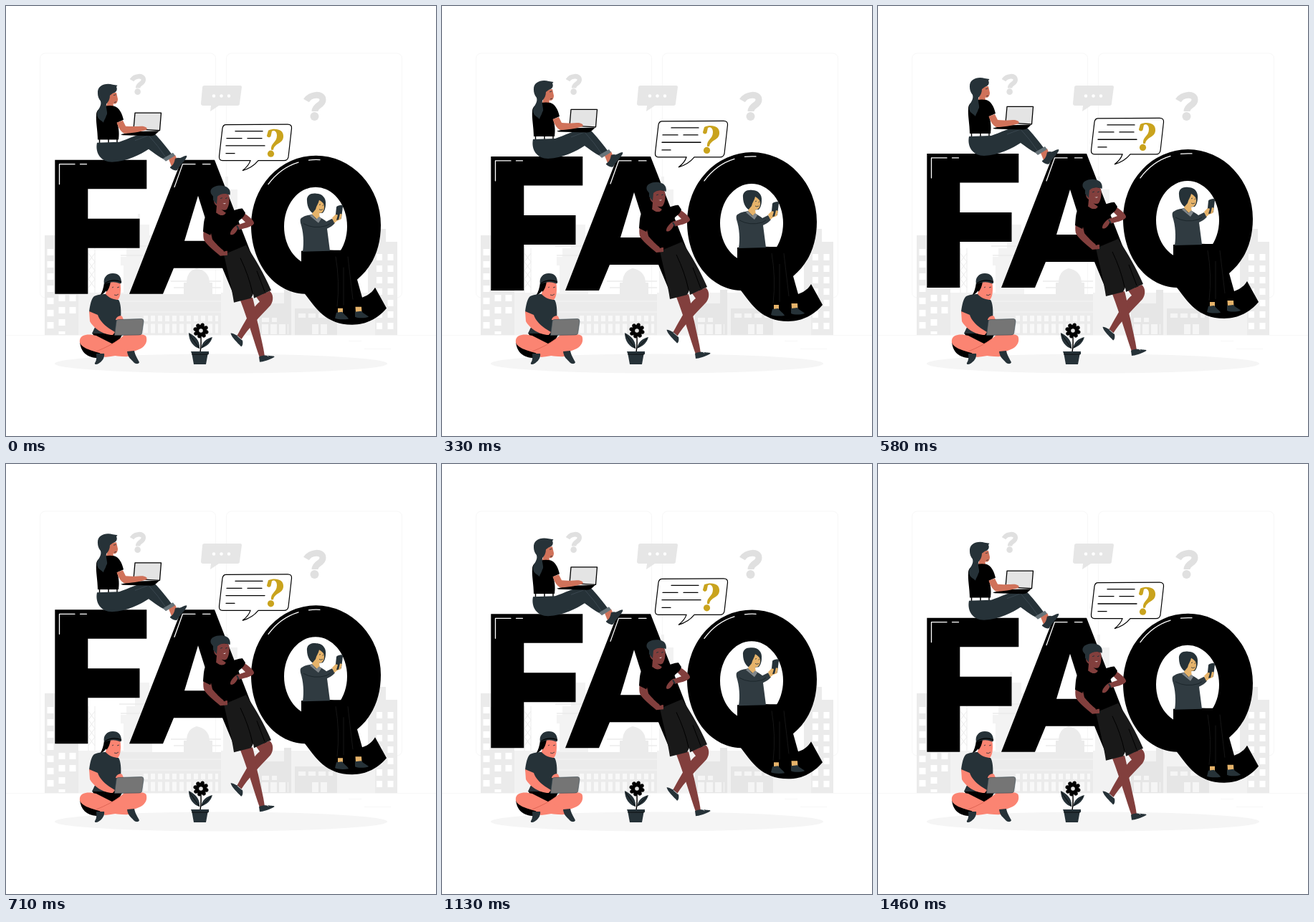
Animation of 600x600 px, one loop 1.5 s. Source, as an HTML page:

```html
<!DOCTYPE html>
<html lang="en">
<head>
<meta charset="utf-8">
<title>FAQ</title>
<style>
  html, body { margin: 0; width: 100%; height: 100%; overflow: hidden; background: #fff; }
  svg { display: block; width: 100vw; height: 100vh; }
  .dark { fill: #263238; }
  .line { fill: none; stroke: #fff; stroke-width: 1.3; stroke-linecap: round; stroke-linejoin: round; }
  .ink { stroke: #000; }
  .rose { fill: #d0725a; }
  .brown { fill: #823f3d; }
  .tan { fill: #e6b36a; }
  .salmon { fill: #fb8472; }
  .win { fill: none; stroke: #fff; }
</style>
</head>
<body>
<svg viewBox="0 0 600 600">
  <defs>
    <g id="question">
      <path d="M419 132C424 123 442 121 442 131C442 139 431 138 431 147" fill="none" stroke="#e0e0e0" stroke-width="9"/>
      <circle cx="430.500" cy="154" r="6" fill="#e0e0e0"/>
    </g>
  </defs>

  <!-- backdrop -->
  <g fill="none" stroke="#f7f7f7">
    <rect x="47.500" y="66" width="245" height="341" rx="7"/>
    <rect x="307.500" y="66" width="245" height="341" rx="7"/>
    <path d="M0 459.500H600M478 467.500H496M500 478.500H537"/>
  </g>

  <!-- city -->
  <g fill="#ebebeb">
    <path d="M101 400H187V459H101ZM300 400H530V459H300ZM303 256H323V400H303ZM306 238H310V256H306Z" fill="#f2f2f2"/>
    <path d="M54 320H68V339H101V459H54ZM505 311H530V329H546V459H515V400H505Z"/>
    <path d="M180 305H184V290H187V305H200V320H204V402H164V362H160V350H168V338H180Z" fill="#f3f3f3"/>
    <path d="M158 335H200M160 348H200M230 384H300M234 393H300" stroke="#ebebeb" stroke-width="1.500"/>
    <path d="M248 402V386H252C252 372 260 368 266 366C276 368 284 374 284 386H288V402Z"/>
    <path d="M158 402H300V459H158Z"/>
    <path d="M353 415H398V459H353ZM388 396H398V420H388ZM403 422H462V459H403Z" fill="#e6e6e6"/>
  </g>
  <path d="M115 338V400M124 338V400M115 345L124 357L115 369L124 381L115 393M124 345L115 357L124 369L115 381L124 393" fill="none" stroke="#ebebeb"/>
  <g class="win">
    <path d="M62 339V458M78 403V458M93 403V430" stroke-width="9" stroke-dasharray="9 8"/>
    <path d="M536.500 346V452M521 346V452" stroke-width="8" stroke-dasharray="9 7"/>
    <path d="M192 436H296" stroke="#f8f8f8" stroke-width="8" stroke-dasharray="6 4"/>
    <path d="M192 450H296" stroke="#f8f8f8" stroke-width="13" stroke-dasharray="6 4"/>
    <path d="M158 412H300M158 427H300" stroke="#f5f5f5"/>
    <path d="M357 438H378M408 432H456" stroke="#f5f5f5" stroke-width="6" stroke-dasharray="10 4"/>
    <path d="M357 451H394M427 451H449" stroke="#f5f5f5" stroke-width="14" stroke-dasharray="9 3"/>
  </g>
  <ellipse cx="300" cy="499" rx="232" ry="13.500" fill="#f5f5f5"/>

  <use href="#question"/>
  <use href="#question" transform="translate(-122 8) scale(.71 .725)"/>
  <path d="M277 111H327Q329 111 329 113L326 136Q326 139 323 139H297L285 147L286 139H275Q272 139 272 136L274 114Q274 111 277 111Z" fill="#e6e6e6"/>
  <path d="M290 125.500h0M300.500 125.500h0M311 125.500h0" class="line" style="stroke-width:4.600"/>

  <g id="floating">
    <!-- letters -->
    <path d="M68.300 215H196.300V255.500H114.300V297H186.500V338H114.300V402H68.300Z"/>
    <path d="M245 215H291L364 402H317L302 366H234L219 402H172ZM268 265L249 328H288Z" fill-rule="evenodd"/>
    <path d="M342 306A90.500 97 0 0 1 523 306C523 337 512 364 490 382L497 407C504 405 511 400 515 393L531 422C521 434 505 445 483 445C446 445 432 421 417 402C372 400 342 357 342 306ZM388 308A44 55 0 0 0 476 308A44 55 0 0 0 388 308Z" fill-rule="evenodd"/>
    <path class="line" d="M74.500 249V221H96M103.500 221H112.500M235 253L246.500 221H264M274.500 221H285M366 249C377 234 390 224 408 218.500M422.500 215.500Q430 214.500 438 215"/>

    <!-- speech bubble -->
    <path d="M307 166L393 165.500Q399 165.500 398.500 171L394 211Q393 216 388 216H352Q344 226 330 230Q339 223 341 216H302Q297 216 297.500 210L302 171Q303 166 307 166Z" fill="#fff" stroke="#000" stroke-width="1.200"/>
    <path class="line ink" d="M320 175H358M308 185H329M337 185H357M307 195.300H361M307 206H319"/>
    <path d="M366 174C375 170 388 172 387 183C386 193 375 191 373 201H370C369 191 378 191 378 181C378 175 374 173 371 175L369.500 182C367 185 364 183 364 181Z" fill="#c9a31d"/>
    <circle cx="369.500" cy="206.500" r="4.600" fill="#c9a31d"/>

    <!-- woman with laptop -->
    <path class="rose" d="M145 122L154 121L156 130C156 135 153 138 149.500 136.500L150 141L139 143Z"/>
    <path d="M132 143C137 139 146 139 151 140C158 142 162 150 164 159L155 163C158 172 158 180 157 187H128C128 175 125 160 126 152C126 147 129 144 132 143Z"/>
    <path class="dark" d="M128 122C127 111 139 107 149 110L155.500 111L154 113C156 117 154 121 149 122L145 125C145 130 143 134 140 137C139 144 143 150 140 153C139 157 136 161 136 163C134 160 126 158 127 150C128 144 134 140 132 133C129 129 128 126 128 122Z"/>
    <path d="M150 125L153.500 124M151 135L154 134" stroke="#263238" stroke-width=".8"/>
    <path d="M128 187H157.500V191H128Z" fill="#fff"/>
    <path d="M130.500 186V192M143 186V192M155 186V192" stroke="#000" stroke-width="1.500"/>
    <path class="rose" d="M227 214L236 208L240 217L231 224Z"/>
    <path class="dark" d="M127 191L158 190C170 186 186 178 199 176C204 176 207 178 210 181C219 191 226 200 232 208L222 215C213 211 205 204 199 200C188 207 170 217 148 218C133 218 124 206 127 191Z"/>
    <path d="M180 188Q191 184 199 181Q212 195 224 213" fill="none" stroke="#435059" stroke-width=".7"/>
    <path d="M219 213L233 205L236 209L223 217Z" fill="#68747a"/>
    <path class="dark" d="M229 225C234 222 235 218 236 213L240 212C243 214 248 209 252 209C254 212 244 221 239 229C238 231 232 229 229 226Z"/>
    <path d="M180 149.500L216.500 149.500L214.500 174L178 172Z" fill="#e4e4e4" stroke="#000" stroke-width="1.300" stroke-linejoin="round"/>
    <path d="M160 179.500L177 175.500L214 174.500L209 179Q207 181 202 181.500L163 180.500Z"/>
    <path class="rose" d="M154.500 163L163 160L167 168C176 169 186 168 191 168C196 169 198 171 196 173C188 176 172 178 165 178C160 176 156 168 154.500 163Z"/>

    <!-- leaning man -->
    <path class="brown" d="M349 406L368 398C373 402 374 411 369 418C355 433 338 450 328 466L322 461C331 445 344 420 354 413Z"/>
    <path class="brown" d="M327 411L344 407C348 420 349 435 352 445C355 460 359 475 361 489L354 491C346 468 338 440 327 411Z"/>
    <path class="dark" d="M313.500 457C316 456 321 460 323 460L330 467C331 471 330 475 328 475.500C323 470 315 463 313.500 457ZM353 490C358 487 363 488 366 488C370 489 375 488 374.500 490C368 494 358 497 354 497Z"/>
    <path d="M323 461L329 466M361 486L366 489" class="line" style="stroke-width:.8"/>
    <path d="M304 347L335 334C348 353 361 376 370 397L346 408L345 402L342 408L318 414C315 393 309 370 304 347Z" fill="#191919"/>
    <path d="M327 352Q339 377 344 401M350 370L361 399" fill="none" stroke="#000"/>
    <path class="brown" d="M291 266C299 261 308 261 311 264C312.500 272 311 280 308 284C305 286 302 285 300 284L307 289C305 294 297 293 293 290L294 279C290 277 289 271 291 266Z"/>
    <path class="dark" d="M286 262C283 254 293 250 302 251C310 252 314 257 312.500 264C306 261 299 262 295 266L294 277L289 271L289 266Z"/>
    <path d="M302 275.500Q304 276.500 306.500 275Q306 278 302 275.500Z" fill="#fff"/>
    <path d="M299 269L302 268M306 269L309 268" stroke="#263238"/>
    <path class="brown" d="M276 311L286 317L288 326C293 332 299 338 303 341L309 342V348L299 349C291 342 279 333 276 326C275 322 275 317 276 311Z"/>
    <path class="brown" d="M332 289C338 293 347 300 346 304C343 309 330 311 323 313C322 317 318 322 314 320C311 317 316 310 320 307L334 302L328 296Z"/>
    <path d="M280 292C286 289 291 289 294 289C299 294 305 293 307 289C318 286 327 282 330 283L334 289C333 293 330 296 326 299L321 305C325 312 331 325 333 333L304 343C300 330 291 320 287 315L285 320L275 315C276 303 276 296 280 292Z"/>
    <path class="brown" d="M324 305C319 307 312 314 313 319C316 321 320 318 323 312Z"/>
    <path d="M322 307L325 312" stroke="#263238" stroke-width="2"/>

    <!-- woman with phone -->
    <path d="M412 342C432 340 455 341 471 341C477 342 480 350 482 364L497 419L486 421L472 382L471 422L461 423L457 370L412 366Z"/>
    <path d="M460 350Q466 385 462 420M477 350L484 410M471 365V418" fill="none" stroke="#161616"/>
    <path class="tan" d="M463 422H470V430H463ZM487.500 420H496L496.500 428H488Z"/>
    <path class="dark" d="M461 428L469 427C472 431 477 434 478 437C472 438 464 438 459 436ZM487 427L496 426C499 430 505 432 506 434C500 436 491 436 487 434Z"/>
    <path class="dark" d="M420 272C419 264 426 261 433 262C441 262 447 268 446 277C446 282 444 287 442 289L430 290C425 289 420 281 420 272Z"/>
    <path class="tan" d="M432 284C433 279 436 276 437 271C440 273 444 275 444 280C444 286 441 290 437 289L438 297L429 299L427 290Z"/>
    <path d="M437 278L439 277M441.500 279L443 278M437 284Q439 286 442 284" fill="none" stroke="#263238" stroke-width=".8"/>
    <path d="M414 295C418 292 424 292 427 291L436 300L438 295C441 297 445 299 447 301L455 297L459 303C455 308 450 310 448 311L452 342L414 343C416 330 415 315 411 303C410 298 411 296 414 295Z" fill="#303b41"/>
    <path d="M415 304Q429 312 447 307L452 304" fill="none" stroke="#1c262b"/>
    <path d="M424 293L427 291L433 298L437 294L440 297L436 303Z" fill="#80868a"/>
    <path class="tan" d="M455 296L460 291L467 290L468 297L462 300L458 303Z"/>
    <path class="dark" d="M461 281Q461 279 468 278Q470 278 470 280L468 296Q467 298 461 299Q459 298 459.500 296Z"/>
    <path class="tan" d="M457 295L461 291L463 292L461 299L458 301ZM466 290L469 291L467 298L464 299Z"/>
  </g>

  <!-- seated person -->
  <path d="M103 468C104 484 115 492 131 491L150 484L130 472ZM120 456L163 457L153 476L126 466Z"/>
  <path class="salmon" d="M196 463C196 456 180 458 165 459C155 468 145 474 127 481L138 490C155 488 175 484 188 478C195 474 197 468 196 463Z"/>
  <path class="salmon" d="M103 466C104 458 116 457 126 460C145 470 158 476 172 482L172 489C160 490 130 486 112 478C105 474 102 471 103 466Z"/>
  <path d="M126 482Q146 474 158 465" fill="none" stroke="#d85f50" stroke-width=".8"/>
  <path class="dark" d="M126 485L137 485C138 491 134 496 129 499C126 501 123 500 124 498C127 494 126 490 126 485ZM169 482L179 481C180 487 184 493 186 497C185 500 181 500 178 497C175 493 170 491 169 482Z"/>
  <path d="M137 386H144C143 394 139 401 131 404C134 400 136 394 137 386Z"/>
  <path class="salmon" d="M142 380H158C161 390 161 406 156 410C153 412 150 411 148 410L149 415L137 408L140 398Z"/>
  <path d="M138 385H146C145 391 143 396 140 399Z"/>
  <path class="dark" d="M123 405C130 402 136 402 139 402C144 408 152 410 157 410C160 414 161 425 160 437L156 457L120 457C123 450 125 447 126 443L116 427C117 418 119 408 123 405Z"/>
  <path class="dark" d="M137 388C135 379 141 373 149 373C157 373 160 377 161 384Q162 388 158 387Q149 383 137 388Z"/>
  <path d="M138 387Q149 380 161 385" fill="none" stroke="#000" stroke-width="1.200"/>
  <path d="M148 393L150 392M155 393L158 392M151 403Q154 405 157 402" fill="none" stroke="#263238" stroke-width=".8"/>
  <path class="salmon" d="M116 426L128 431C130 438 137 445 144 450L152 455L149 459C135 459 122 449 117 440ZM153 438C154 433 160 431 162 433L165 440Z"/>
  <path d="M154 440Q154 437.500 157 437.500L189 436.500Q192 436.500 192 440L189.500 457Q189 459 185 459L151.500 459.500Z" fill="#757575" stroke="#37474f" stroke-width=".6"/>

  <!-- flower -->
  <path d="M271 483Q273 470 271.500 455" fill="none" stroke="#000" stroke-width="1.500"/>
  <path class="dark" d="M255 456C263 460 271 466 270 478C262 476 255 468 255 456ZM272 478C274 468 280 464 288 462C286 470 280 475 272 478ZM258 482H283V486H281.500L279 500H262L259.500 486Z"/>
  <path d="M256 458L270 478M273 477L286 464M259 486H282" fill="none" stroke="#000" stroke-width=".8"/>
  <g id="petals"></g>
  <circle cx="272" cy="453" r="4" fill="#e0e0e0" stroke="#000" stroke-width="2.400"/>
</svg>
<script>
  const LOOP = 1500, STEPS = 36, RISE = 12;
  const floating = document.getElementById('floating');

  document.getElementById('petals').innerHTML = Array.from({ length: 8 }, (_, i) =>
    `<ellipse cx="272" cy="446" rx="2.900" ry="3.800" transform="rotate(${i * 45 + 15} 272 453)"/>`).join('');

  // Linear rise and fall in even steps.
  function draw(now) {
    const step = Math.floor(((now + 2) % LOOP) / LOOP * STEPS);
    const phase = (step + 0.55) / STEPS;
    const lift = RISE * (1 - Math.abs(1 - 2 * phase));
    floating.setAttribute('transform', `translate(0 ${-lift.toFixed(3)})`);
    requestAnimationFrame(draw);
  }
  draw(performance.now());
</script>
</body>
</html>
```
